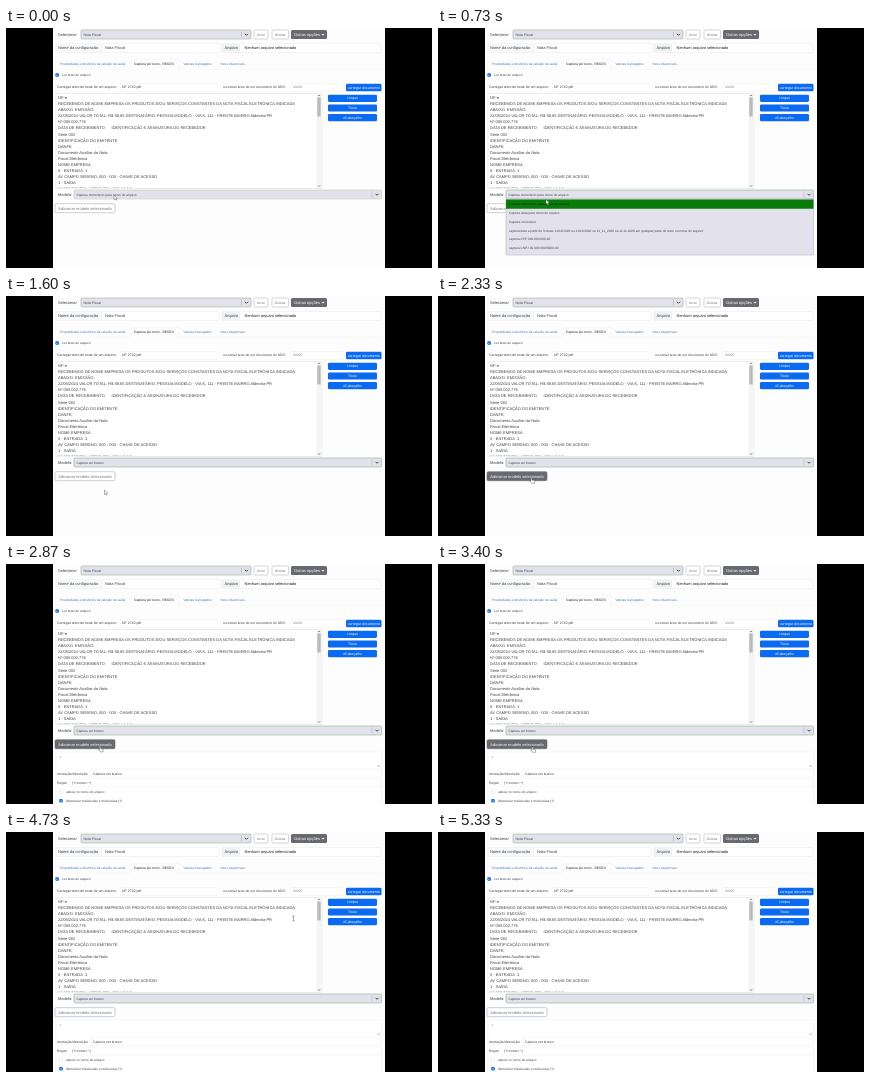
Write an HTML page with a canvas that moves like this. It is 426x240 px and loops after 5.39 s.

```html
<!DOCTYPE html>
<html lang="pt-BR">
<head>
<meta charset="utf-8">
<style>
html, body { margin: 0; width: 100%; height: 100%; overflow: hidden; background: #000; }
canvas { display: block; width: 426px; height: 240px; }
</style>
</head>
<body>
<canvas id="stage" width="426" height="240"></canvas>
<script>
const ctx = document.getElementById('stage').getContext('2d');
const LOOP = 5390, STEP = 200 / 3;
const INK = '#3c3f46', BLUE = '#0b6af2', GRAY = '#686a70', LAVENDER = '#e3e2ec';
const OPEN = 470, CLOSE = 1400, HOVER = 2070, ADDED = 2730, LEAVE = 3600;

const noteLines = [
  'NF-e',
  'RECEBEMOS DE NOME EMPRESA OS PRODUTOS E/OU SERVIÇOS CONSTANTES DA NOTA FISCAL ELETRÔNICA INDICADA',
  'ABAIXO. EMISSÃO:',
  '22/05/2024 VALOR TOTAL: R$ 88,65 DESTINATÁRIO: PESSOA MODELO - VIA K, 111 - FRENTE BAIRRO Aldeoria-PR',
  'Nº 000.002.778',
  'DATA DE RECEBIMENTO      IDENTIFICAÇÃO E ASSINATURA DO RECEBEDOR',
  'Série 002',
  'IDENTIFICAÇÃO DO EMITENTE',
  'DANFE',
  'Documento Auxiliar da Nota',
  'Fiscal Eletrônica',
  'NOME EMPRESA',
  '0 - ENTRADA  1',
  'AV CAMPO SERENO, 000 - 000 - CHAVE DE ACESSO',
  '1 - SAÍDA',
  'Nº 000.002.778 - SÉRIE 002 - FOLHA 1/1'
];

const options = [
  'Captura nome/texto para nome do arquivo',
  'Captura data para nome do arquivo',
  'Captura em branco',
  'captura data a partir do formato 11/11/2020 ou 11/12/2020 ou 11_11_2020 ou 11.11.2020 em qualquer parte do texto ou nome do arquivo',
  'captura CPF 000.000.000-00',
  'captura CNPJ 00.000.000/0000-00'
];

// time, x, y
const pointerPath = [
  [0, 108, 167], [400, 108, 170], [800, 108, 172], [1200, 99, 193], [1600, 98.5, 194],
  [1800, 98.5, 194], [2150, 93, 182], [3450, 94, 183], [4000, 237, 95],
  [4450, 237, 95], [5000, 384, 70], [LOOP, 384, 70]
];

// Text is laid out ten times larger so that small sizes keep linear widths.
function text(str, x, y, size = 4, color = INK, align = 'left') {
  ctx.save();
  ctx.translate(x, y);
  ctx.scale(.1, .1);
  ctx.font = `${size * 10}px "Liberation Sans", Arial, sans-serif`;
  ctx.textRendering = 'geometricPrecision';
  ctx.textAlign = align;
  ctx.textBaseline = 'middle';
  ctx.fillStyle = color;
  ctx.fillText(str, 0, 0);
  ctx.restore();
}

function box(x, y, w, h, fill, stroke, radius = 1) {
  ctx.beginPath();
  ctx.roundRect(x, y, w, h, radius);
  if (fill) { ctx.fillStyle = fill; ctx.fill(); }
  if (stroke) { ctx.strokeStyle = stroke; ctx.lineWidth = .6; ctx.stroke(); }
}

function button(label, x, y, w, h, size, fill, color, stroke) {
  box(x, y, w, h, fill, stroke, 1.3);
  text(label, x + w / 2, y + h / 2 + .2, size, color, 'center');
}

function stroke(points, color, width = .7) {
  ctx.beginPath();
  points.forEach(([x, y]) => ctx.lineTo(x, y));
  ctx.strokeStyle = color;
  ctx.lineWidth = width;
  ctx.stroke();
}

function select(label, x, y, w, size, border) {
  box(x, y, w, 9, LAVENDER, border);
  text(label, x + 2.5, y + 4.7, size);
  const right = x + w;
  stroke([[right - 9.5, y + 1.5], [right - 9.5, y + 7.5]], '#aaaab0', .5);
  stroke([[right - 6, y + 3.8], [right - 4.5, y + 5.3], [right - 3, y + 3.8]], '#333', .9);
}

function checkbox(x, y, label) {
  box(x - 1.8, y - 1.8, 3.6, 3.6, BLUE);
  stroke([[x - 1, y], [x - .3, y + .8], [x + 1, y - .8]], '#fff', .5);
  text(label, x + 5, y + .1, 3.2);
}

function header() {
  text('Selecionar', 52, 6.7);
  select('Nota Fiscal', 75, 2, 170, 3.5, '#a3b596');
  button('Novo', 248, 2, 14, 9, 3.4, '#fff', '#777', '#b8bbc0');
  button('Deletar', 266, 2, 16.5, 9, 3.4, '#fff', '#777', '#b8bbc0');
  box(285, 2, 36, 9, GRAY, null, 1.5);
  text('Outras opções', 288, 6.7, 4, '#fff');
  ctx.beginPath();
  ctx.moveTo(315.5, 6); ctx.lineTo(318.5, 6); ctx.lineTo(317, 7.5);
  ctx.fillStyle = '#fff';
  ctx.fill();

  box(50, 15.5, 46, 9, '#f8f9fa', '#eeeff1');
  box(96, 15.5, 117, 9, '#fff', '#eeeff1');
  text('Nome da configuração', 52, 20.2);
  text('Nota Fiscal', 99, 20.2);
  box(216, 15.5, 159, 9, '#fff', '#eeeff1');
  box(216, 15.5, 18, 9, '#f0f1f3', null);
  text('Arquivo', 218.5, 20.2);
  text('Nenhum arquivo selecionado', 238.5, 20.2, 4, '#17181a');

  stroke([[50, 41], [125, 41], [125, 31.5], [173, 31.5], [173, 41], [376, 41]], '#f0f1f3', .5);
  text('Propriedades e diretórios da seleção de saída', 54, 36.2, 3.2, '#3475b5');
  text('Captura por texto - REGEX', 128, 36.2, 3.3, '#222');
  text('Valores Carregados', 177.5, 36.2, 3.2, '#3475b5');
  text('Novo disponíveis', 214.5, 36.2, 3.2, '#3475b5');
  checkbox(51.2, 47, 'Ler texto do arquivo');

  text('Carregar texto de teste de um arquivo:', 51, 59.5, 3.5);
  box(114.5, 55.5, 97, 8, '#fff', '#f1f2f3');
  text('NF 2710.pdf', 116, 59.5, 3.5);
  text('ou extrair texto de um documento do GED:', 217, 59.5, 3.3);
  box(285, 55.5, 53, 8, '#fff', '#f1f2f3');
  text('00000', 287, 59.5, 3.4, '#8b8e92');
  button('carregar documento', 340, 55.7, 35.5, 7.6, 3.6, BLUE, '#fff');
  ['Limpar', 'Título', '#Cabeçalho'].forEach((label, i) =>
    button(label, 322, 66.7 + i * 9.7, 49, 7.2, 3.5, BLUE, '#fff'));
}

function note() {
  box(50, 65.5, 266, 95, '#fff', '#e4e5e8');
  ctx.save();
  ctx.beginPath();
  ctx.rect(50, 65, 260, 94.8);
  ctx.clip();
  noteLines.forEach((line, i) => text(line, 52, 70 + i * 6.07));
  ctx.restore();
  box(310.7, 66, 4.6, 94, '#f4f4f4', null, 0);
  box(311.3, 69.5, 3.4, 19, '#b9babb', null, 0);
  stroke([[312, 68], [313, 67], [314, 68]], '#666');
  stroke([[312, 157.5], [313, 158.5], [314, 157.5]], '#555');
}

function dropdown(t) {
  const active = t < 900 ? 0 : t < 1070 ? 1 : 2;
  box(68, 171, 307.5, 56, LAVENDER, '#b9b9c4', 0);
  box(68, 171.5 + active * 8.9, 307.5, 9.2, '#087b08', null, 0);
  options.forEach((label, i) =>
    text(label, 71, 176.4 + i * 8.8, 3.2, i === active ? '#102a10' : INK));
}

function capture() {
  box(50, 188, 325.5, 58, '#fff', '#f1f2f3');
  text('x', 53.5, 193.3, 3.6, '#d98a5a');
  stroke([[371.8, 201.6], [372.8, 202.6], [373.8, 201.6]], '#555', .6);
  box(85, 205, 290, 8, '#fff', '#f1f2f3');
  text('Anotação/descrição', 51, 209.6, 3.5);
  text('Captura em branco', 87, 209.6, 3.4);
  box(64, 215, 311, 8, '#fff', '#f1f2f3');
  text('Regex', 51, 219.3, 3.5);
  text('(?<nome>.*)', 66, 219.3, 3.4);
  box(53.2, 226.2, 3.4, 3.4, '#fff', '#dddfe2');
  text('aplicar no nome do arquivo', 60, 228, 3.2);
  checkbox(55, 236.7, 'diferenciar maiúsculas e minúsculas (?)');
}

function pointerAt(t) {
  const i = pointerPath.findIndex(p => p[0] > t);
  const [t0, x0, y0] = pointerPath[i - 1], [t1, x1, y1] = pointerPath[i];
  const u = (t - t0) / (t1 - t0), k = u * u * (3 - 2 * u);
  return [x0 + (x1 - x0) * k, y0 + (y1 - y0) * k];
}

function pointer(t) {
  const [x, y] = pointerAt(t);
  if (t > 3750) {
    for (const dy of [-2.4, 2.4]) stroke([[x - 1, y + dy], [x + 1, y + dy]], '#555', .5);
    stroke([[x, y - 2.4], [x, y + 2.4]], '#555', .5);
    return;
  }
  const hand = t >= HOVER && t < LEAVE;
  const shape = hand
    ? [[0, 0], [1, 0], [1, 2], [3.7, 2.7], [3.5, 5.3], [.6, 5.3], [-1.2, 3], [0, 3]]
    : [[0, 0], [0, 4.6], [1.1, 3.7], [1.8, 5.2], [2.6, 4.8], [1.9, 3.4], [3.3, 3.3]];
  ctx.beginPath();
  shape.forEach(([dx, dy]) => ctx.lineTo(x + dx, y + dy));
  ctx.closePath();
  ctx.fillStyle = '#fff';
  ctx.fill();
  ctx.strokeStyle = '#666';
  ctx.lineWidth = .5;
  ctx.stroke();
}

function draw(t) {
  ctx.fillStyle = '#000';
  ctx.fillRect(0, 0, 426, 240);
  ctx.save();
  ctx.beginPath();
  ctx.rect(47, 0, 332, 240);
  ctx.clip();
  ctx.fillStyle = '#fdfdfd';
  ctx.fillRect(47, 0, 332, 240);
  header();
  note();
  text('Modelo:', 52, 166.8);
  select(options[t < CLOSE ? 0 : 2], 68, 162, 307.5, 3.2, t < OPEN ? '#c6cdb4' : '#8fb58f');
  if (t >= ADDED) capture();
  const hover = t >= HOVER && t < LEAVE;
  const border = t >= LEAVE ? '#9aa9cf' : '#aeb1b6';
  button('Adicionar modelo selecionado', 49, 175.7, 60, 9, 4,
    hover ? GRAY : '#fff', hover ? '#fff' : '#74787d', hover ? GRAY : border);
  if (t >= OPEN && t < CLOSE) dropdown(t);
  pointer(t);
  ctx.restore();
}

const start = performance.now();
function tick() {
  const t = (performance.now() - start) % LOOP;
  draw(Math.floor(t / STEP) * STEP);
  requestAnimationFrame(tick);
}
tick();
</script>
</body>
</html>
```
